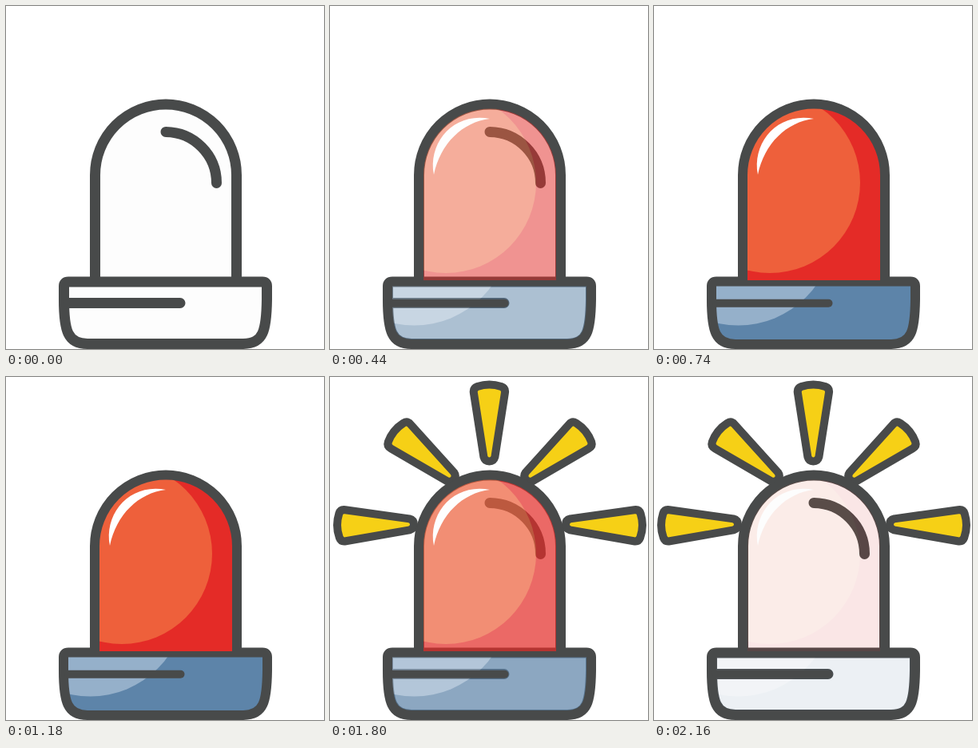
These frames come from a looping animation (398 px wide and 429 px high, 2.22 s). An HTML page:

```html
<!DOCTYPE html>
<html lang="en">
<head>
<meta charset="utf-8">
<title>Siren</title>
<style>
  html, body { margin: 0; height: 100%; overflow: hidden; background: #fff; }
  svg { display: block; width: 398px; height: 429px; }
  .ink { stroke: #484a4a; stroke-linecap: round; stroke-linejoin: round; }
  .plain { fill: #fdfdfd; stroke-width: 13; }
  .tinted { stroke-width: 11; }
  .line { fill: none; }
  #rays { fill: #f6d016; stroke-width: 10; }
</style>
</head>
<body>
<svg viewBox="0 0 398 429">
  <defs>
    <path id="dome" d="M111.5 343V211.5A88.5 88.5 0 0 1 288.5 211.5V343" stroke-linecap="butt"/>
    <path id="base" d="M78 345H321Q326.5 345 326.5 350.5V367C326 406 322 422.5 297 422.5H102C77 422.5 72.5 406 72.5 367V350.5Q72.5 345 78 345Z"/>
    <path id="ray" d="M-19.5-90Q-20.5-96-15-98Q0-103 15-98Q20.5-96 19.5-90L7-10Q5.5-4.5 0-4.5Q-5.5-4.5-7-10Z"/>
    <g id="sideRays">
      <use href="#ray" transform="translate(158.5 131) rotate(-51)"/>
      <use href="#ray" transform="translate(109.5 184.2) rotate(-91)"/>
    </g>
    <clipPath id="inDome"><use href="#dome"/></clipPath>
    <clipPath id="inBase"><use href="#base"/></clipPath>
  </defs>

  <g id="rays" class="ink">
    <use href="#ray" transform="translate(199.4 110)"/>
    <use href="#sideRays"/>
    <use href="#sideRays" transform="translate(400 0) scale(-1 1)"/>
  </g>

  <g class="ink plain">
    <use href="#dome"/>
    <use href="#base"/>
    <path class="line" d="M200 157.5A64 64 0 0 1 263.5 221.5M78 371.5H218"/>
  </g>

  <g id="colour">
    <use href="#base" fill="#5d84a9"/>
    <circle cx="105.5" cy="280" r="119.5" fill="#95b0ca" clip-path="url(#inBase)"/>
    <g class="ink tinted line">
      <use href="#base"/>
      <path d="M78 371.8H218.5" stroke-width="10"/>
    </g>
    <use href="#dome" fill="#e42b27"/>
    <circle cx="145" cy="221" r="113" fill="#ee603b" clip-path="url(#inDome)"/>
    <path fill="#fff" d="M130 211C122 170 156 132 200 141C166 145 138 172 130 211Z"/>
    <use href="#dome" class="ink tinted line"/>
  </g>
</svg>
<script>
  const LOOP = 2220, STEP = 60, STEPS = 10;
  const colour = document.getElementById('colour');
  const rays = document.getElementById('rays');

  // Stepped linear ramp from 0 to 1 whose first step lands at `start`.
  const ramp = (time, start) =>
    Math.max(0, Math.min(STEPS, Math.floor((time - start) / STEP) + 1)) / STEPS;

  function draw(now) {
    const time = now % LOOP;
    colour.style.opacity = ramp(time, 200) - ramp(time, 1680);

    // Rays have one-bit transparency: they pop in past half, then their edges fill out.
    const strength = ramp(time, 940);
    rays.style.visibility = strength > 0.5 ? 'visible' : 'hidden';
    if (strength > 0.5) rays.style.strokeWidth = 11 - 1 / strength;
    requestAnimationFrame(draw);
  }
  draw(performance.now());
</script>
</body>
</html>
```
